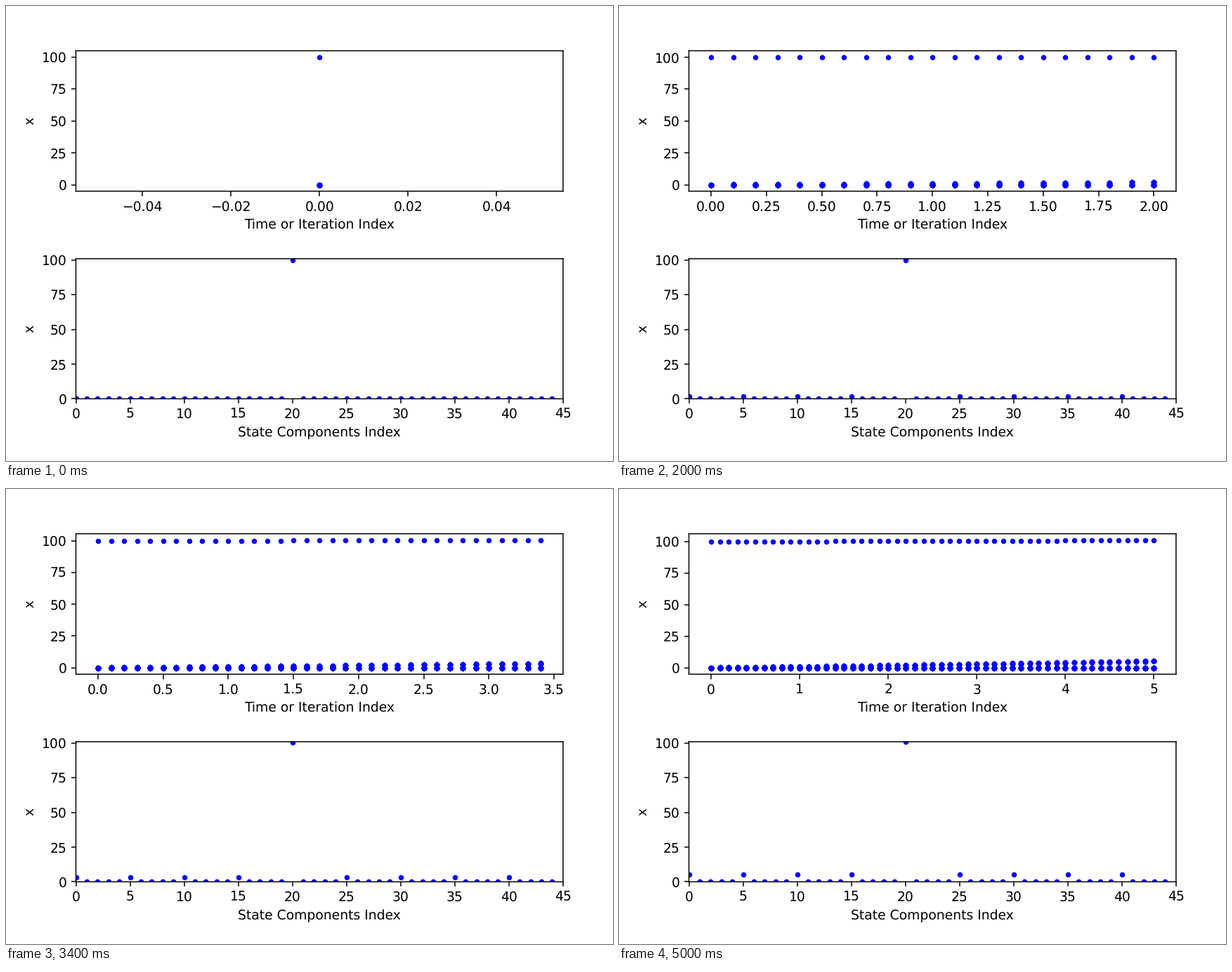
A matplotlib script that plays this animation: 864x648 px, repeating every 5.1 s.

```python
import numpy as np
import matplotlib.pyplot as plt
from matplotlib.animation import FuncAnimation

W, H, DPI = 864, 648, 135
STEPS, DT = 51, 0.1
CELLS, PER_CELL = 9, 5

plt.rcParams.update({
    "font.family": "DejaVu Sans",
    "font.size": 10,
    "path.snap": False,
    "text.hinting": "none",
})


def states(t):
    """One row of 45 components per time; only the first one of each cell varies."""
    x = np.zeros((len(t), CELLS * PER_CELL))
    corner = 0.85 * t + 0.033 * t**2
    edge = corner + 0.014 * t**2
    for cell in range(CELLS):
        x[:, cell * PER_CELL] = edge if cell % 2 else corner
    x[:, 4 * PER_CELL] = 100 + 0.041 * t**2
    return x


def add_axes(top, bottom, xlabel):
    left, right = 99.5, 792.9
    ax = fig.add_axes([left / W, 1 - bottom / H, (right - left) / W, (bottom - top) / H])
    ax.set_xlabel(xlabel)
    ax.set_ylabel("x")
    dots, = ax.plot([], [], "b.")
    return ax, dots


times = np.arange(STEPS) * DT
x = states(times)
index = np.arange(x.shape[1])

fig = plt.figure(figsize=(W / DPI, H / DPI), dpi=DPI)
history_ax, history = add_axes(63.7, 263.7, "Time or Iteration Index")
state_ax, state = add_axes(359.9, 559.4, "State Components Index")
state_ax.set_xlim(0, x.shape[1])
state_ax.set_ylim(0, x.max())


def draw(n):
    seen = slice(0, n + 1)
    history.set_data(np.repeat(times[seen], x.shape[1]), x[seen].ravel())
    history_ax.relim()
    history_ax.autoscale_view()
    state.set_data(index, x[n])
    return history, state


anim = FuncAnimation(fig, draw, frames=STEPS, interval=100, repeat=True,
                     repeat_delay=0, init_func=lambda: draw(0))
plt.show()
```
